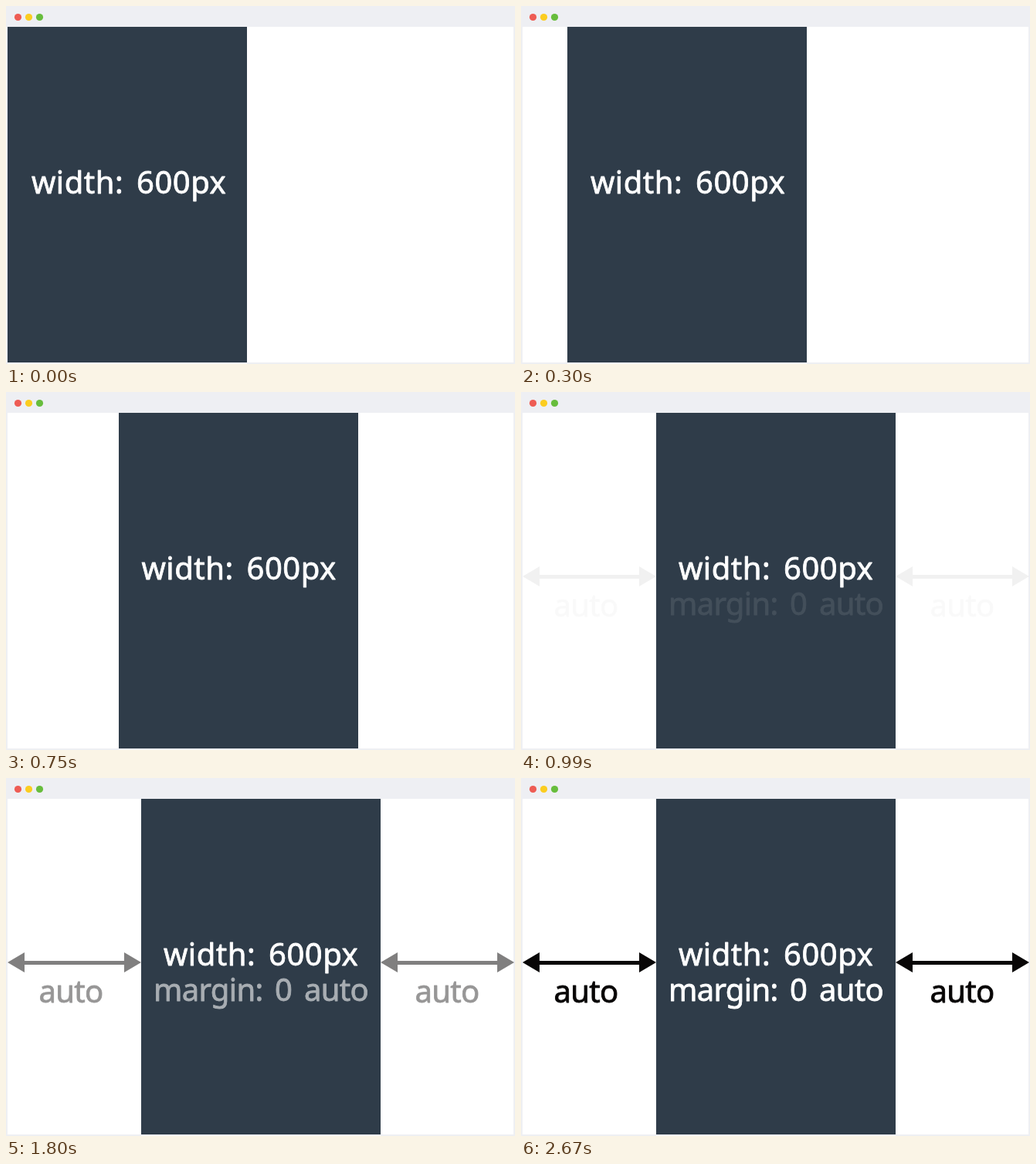
Write an HTML page that moves like this. It is 659 by 464 pixels and loops after 4.7 s.

```html
<!DOCTYPE html>
<html lang="en">
<head>
<meta charset="utf-8">
<title>Centering with auto margins</title>
<style>
  html, body { margin: 0; width: 100%; height: 100%; overflow: hidden; }
  svg { display: block; }
  text {
    font: 500 40px "Noto Sans", "Open Sans", sans-serif;
    text-anchor: middle;
    word-spacing: 6px;
    letter-spacing: -.7px;
    stroke-width: .8px;
    stroke-linejoin: round;
  }
  .light { fill: #fff; stroke: #fff; }
  .dark { fill: #080606; stroke: #080606; }
  #size { letter-spacing: .5px; }
</style>
</head>
<body>
<svg width="659" height="464" viewBox="0 0 659 464">
  <defs>
    <path id="arrow" fill="#080606" d="M0 13L22 0V11H151V0L173 13L151 26V16H22V26Z"/>
  </defs>
  <rect width="659" height="464" fill="#eeeff3"/>
  <rect x="2" y="27" width="655" height="435" fill="#fff"/>
  <circle cx="15.5" cy="14.5" r="4.6" fill="#ee5c54"/>
  <circle cx="29.5" cy="14.5" r="4.6" fill="#fbcd20"/>
  <circle cx="43.5" cy="14.5" r="4.6" fill="#67bd3c"/>

  <rect id="box" y="27" width="310" height="435" fill="#2f3c49"/>
  <text id="size" class="light" y="242.5">width: 600px</text>

  <g id="arrows">
    <use href="#arrow" x="2" y="226"/>
    <use href="#arrow" x="485" y="226"/>
  </g>
  <text id="rule" class="light" x="330" y="289">margin: 0 auto</text>
  <g id="labels">
    <text class="dark" x="84" y="291">auto</text>
    <text class="dark" x="571" y="291">auto</text>
  </g>
</svg>
<script>
  const LOOP = 4700, TICK = 30, SLIDE = 900, FADE_END = 2670;
  const $ = id => document.getElementById(id);
  const clamp = v => Math.min(1, Math.max(0, v));

  // The fade advances in uneven holds, given in ticks after the slide.
  const holds = [3, 3, 4, 4, 4, 4, 4, 4, 4, 3, 3, 3, 3, 3, 2, 2, 2, 2, 1, 1];
  let sum = SLIDE;
  const steps = [SLIDE, ...holds.map(n => sum += n * TICK)];

  function draw(t) {
    const slide = clamp(Math.floor(t / TICK) * TICK / SLIDE);
    $('box').setAttribute('x', Math.round(2 + 173 * slide));
    $('size').setAttribute('x', 159 + 171 * slide);

    const at = steps.filter(s => s <= t).pop() ?? SLIDE;
    const fade = clamp((at - SLIDE) / (FADE_END - SLIDE));
    $('arrows').setAttribute('opacity', fade);
    $('rule').setAttribute('opacity', fade ** .8);
    $('labels').setAttribute('opacity', fade ** 1.3);
  }

  const start = performance.now();
  function frame() {
    draw((performance.now() - start) % LOOP);
    requestAnimationFrame(frame);
  }
  frame();
</script>
</body>
</html>
```
